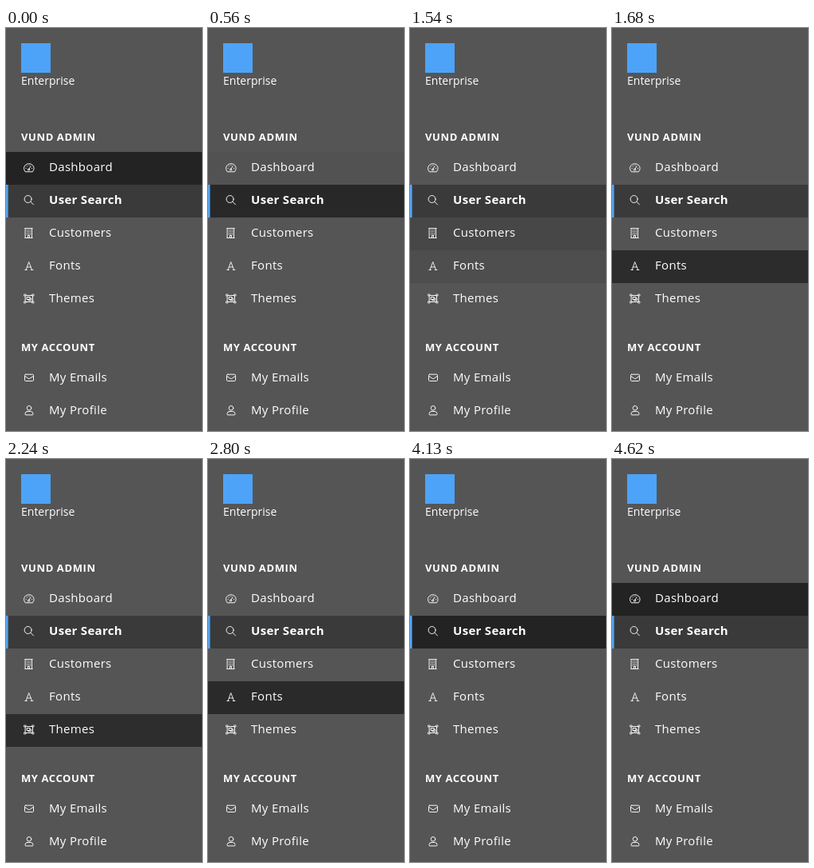
These frames come from a looping animation (246x504 px, 4760 ms). An HTML page:

```html
<!DOCTYPE html>
<html lang="en">
<head>
<meta charset="utf-8">
<title>Sidebar menu</title>
<style>
  html, body { margin: 0; width: 100%; height: 100%; overflow: hidden; background: #555; }
  svg { display: block; width: 246px; height: 504px; }
  text { fill: #fff; font-family: "Open Sans", "Noto Sans", sans-serif; }
  .item { font-size: 15px; letter-spacing: .3px; }
  .bold { font-weight: 700; }
  .head { font-size: 13px; font-weight: 700; letter-spacing: .6px; }
  .icon { fill: none; stroke: #f4f4f4; stroke-width: 1; stroke-linecap: round; stroke-linejoin: round; }
</style>
</head>
<body>
<svg id="stage" viewBox="0 0 246 504">
  <rect width="246" height="504" fill="#555"/>
  <g id="rows"></g>
  <rect y="196" width="2.6" height="41" fill="#55a5f0"/>
  <rect x="19" y="19" width="37" height="37" fill="#4da3f7"/>
  <text x="19" y="71" font-size="14">Enterprise</text>
  <text class="head" x="19" y="141">VUND ADMIN</text>
  <text class="head" x="19" y="404">MY ACCOUNT</text>
  <g id="labels"></g>
  <g class="icon">
    <!-- gauge -->
    <path d="M24 179.5q-1.5-1.8-1.5-4a6.3 5.8 0 0 1 12.6 0q0 2.2-1.5 4zM28.8 176.6l2.2-3.8M25 175.6h.2M26.2 172.8h.2M28.8 171.7h.1M32.4 175.6h.2"/>
    <circle cx="28.5" cy="177.2" r="1.1"/>
    <!-- magnifier -->
    <circle cx="27.6" cy="214" r="4.5"/>
    <path d="M30.9 217.3l3.6 3.6"/>
    <!-- building -->
    <path d="M24.5 250.5h8v12h-8zM23.8 250.5h9.4M23.8 262.5h9.4M27.5 262v-2.5h2v2.5"/>
    <path d="M26 252.5h5M26 254.5h5M26 256.5h5M26 258.3h5" stroke-linecap="butt" stroke-dasharray="1 1"/>
    <!-- letter -->
    <path d="M25 302.5L28.7 292.5L32.6 302.5M26.4 299h4.8M23.8 302.5h2.6M31.2 302.5h2.7" stroke-width=".95"/>
    <!-- grouped shapes -->
    <path d="M24.5 334.5h9v8h-9zM26.5 336.5h3.5v3h-3.5zM30 338h1.7v2.7h-3.7v-1.2"/>
    <path d="M23 333h2v2h-2zM33 333h2v2h-2zM23 342h2v2h-2zM33 342h2v2h-2z" stroke-width=".8"/>
    <!-- envelope -->
    <rect x="23.5" y="433.2" width="11" height="8.3" rx="1.2"/>
    <path d="M23.7 435.3l4.4 3.1q.9.6 1.8 0l4.4-3.1"/>
    <!-- person -->
    <circle cx="29" cy="475.3" r="2.8"/>
    <path d="M26.8 479.5h4.4q2.8.3 2.8 3v.5q0 .9-.9.9h-8.2q-.9 0-.9-.9v-.5q0-2.7 2.8-3z"/>
  </g>
</svg>
<script>
const LOOP = 4760, STEP = 70, FADE = 350, ROW = 41, TOP = 155;
const BASE = 0x55, ACTIVE = 0x3a, HOVER = 0x23;
const names = ["Dashboard", "User Search", "Customers", "Fonts", "Themes"];
const SELECTED = 1;

// Pointer moves: leave time, enter time, row left, row entered
const moves = [
  [320, 385, 0, 1],
  [945, 965, 1, 2],
  [1390, 1495, 2, 3],
  [1930, 2065, 3, 4],
  [2490, 2605, 4, 3],
  [3045, 3070, 3, 2],
  [3690, 3840, 2, 1],
  [4235, 4255, 1, 0]
];

function add(parent, tag, attrs, text = "") {
  const el = document.createElementNS("http://www.w3.org/2000/svg", tag);
  for (const key in attrs) el.setAttribute(key, attrs[key]);
  el.textContent = text;
  return document.getElementById(parent).appendChild(el);
}

const rows = names.map((name, i) => {
  const y = TOP + i * ROW;
  add("labels", "text", { class: i === SELECTED ? "item bold" : "item", x: 54, y: y + 24 }, name);
  return add("rows", "rect", { y, width: 246, height: ROW });
});
add("labels", "text", { class: "item", x: 54, y: 442 }, "My Emails");
add("labels", "text", { class: "item", x: 54, y: 483 }, "My Profile");

// The standard CSS ease curve, cubic-bezier(.25, .1, .25, 1)
function ease(x) {
  if (x <= 0) return 0;
  if (x >= 1) return 1;
  const curve = (a, b, u) => 3 * a * u * (1 - u) ** 2 + 3 * b * u * u * (1 - u) + u ** 3;
  let low = 0, high = 1;
  for (let i = 0; i < 20; i++) {
    const mid = (low + high) / 2;
    if (curve(.25, .25, mid) < x) low = mid; else high = mid;
  }
  return curve(.1, 1, low);
}

function draw(now) {
  const t = Math.floor((now % LOOP) / STEP) * STEP;
  const hover = [1, 0, 0, 0, 0];
  for (const [leave, enter, from, to] of moves) {
    hover[from] -= ease((t - leave) / FADE);
    hover[to] += ease((t - enter) / FADE);
  }
  rows.forEach((row, i) => {
    const rest = i === SELECTED ? ACTIVE : BASE;
    const level = Math.round(rest + (HOVER - rest) * hover[i]);
    row.setAttribute("fill", `rgb(${level},${level},${level})`);
  });
}

function tick() {
  draw(performance.now());
  requestAnimationFrame(tick);
}
tick();
</script>
</body>
</html>
```
